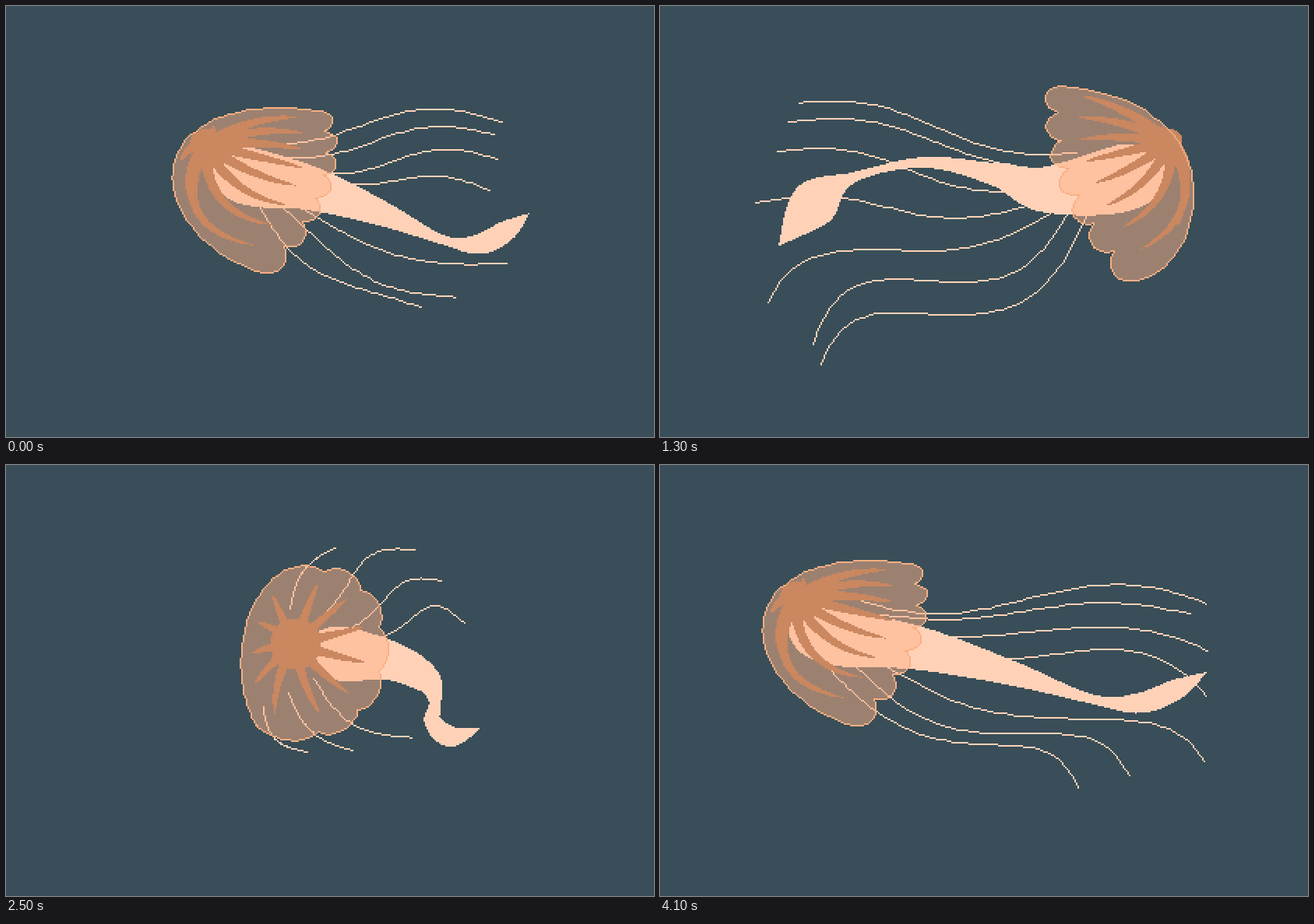
Write an HTML page with a canvas that moves like this. It is 832 px wide and 554 px high and loops after 4.2 s.

```html
<!DOCTYPE html>
<html lang="en">
<head>
<meta charset="utf-8">
<title>Jellyfish</title>
<style>
html, body { margin: 0; width: 100%; height: 100%; overflow: hidden; background: #394e58; }
canvas { display: block; width: 832px; height: 554px; image-rendering: pixelated; }
</style>
</head>
<body>
<canvas id="sea" width="416" height="277"></canvas>
<script>
const ctx = document.getElementById('sea').getContext('2d');
const WATER = '#394e58', PALE = '#ffd2b8', VEIL = 'rgba(255,180,138,.5)', RIB = '#ca8760', RIM = '#f9af82';
const { sin, cos, abs, max, min, floor, round, hypot, PI } = Math;

// Poses face left.
// dome: Bezier from the lowest lobe over the back to the upper lobe; rim: controls of the way back.
// arm: spine points with half width. upper, lower: where the first and last tentacle of a group start.
// legs: tentacle end, sag, wave.
const glide = {
  axis: 836, dx: 0, crown: [174, 170], size: 20, curl: 1, lobe: 14, hook: .4,
  dome: [[246, 335], [80, 278], [87, 95], [318, 127]],
  rim: [[346, 186], [322, 255]],
  arm: [[205, 215, 36], [330, 235, 28], [450, 267, 16], [555, 301, 6], [615, 306, 13], [664, 288, 13], [702, 266, 0]],
  upper: [[225, 163], [400, 252]], lower: [[290, 258], [210, 255]],
  legs: [[701, 178, 7, 21], [680, 191, -6, 10], [703, 238, -17, 6], [701, 297, -28, 8],
    [698, 381, 31, 8], [602, 399, 48, 8], [537, 415, 53, 2]]
};

const open = {
  axis: 832, dx: 0, crown: [177, 174], size: 16, curl: .8, lobe: 18, hook: .4,
  dome: [[219, 352], [135, 340], [78, 125], [318, 102]],
  rim: [[329, 184], [296, 267]],
  arm: [[225, 217, 42], [335, 236, 30], [400, 217, 15], [492, 201, 7], [585, 221, 7], [635, 255, 30], [680, 309, 0]],
  upper: [[297, 189], [362, 257]], lower: [[332, 267], [284, 267]],
  legs: [[653, 124, 0, 14], [668, 149, -11, 11], [682, 187, 0, 14], [709, 253, 5, 13],
    [693, 380, 14, 13], [635, 435, 42, 20], [625, 461, 80, 12]]
};

const turn = {
  axis: 832, dx: 0, crown: [372, 230], size: 33, curl: .25, lobe: 9, hook: 0,
  dome: [[322, 335], [293, 290], [293, 200], [336, 153]],
  rim: [[530, 58], [535, 410]],
  arm: [[420, 241, 34], [495, 252, 25], [540, 276, 18], [551, 304, 8], [548, 330, 11], [572, 349, 13], [611, 337, 0]],
  upper: [[365, 185], [485, 220]], lower: [[395, 275], [330, 310]],
  legs: [[423, 106, -15, 0], [525, 109, -24, 8], [559, 149, -17, 7], [589, 203, -24, 8],
    [521, 350, 24, 0], [445, 367, 17, 0], [387, 369, 18, 0]]
};

const lerp = (a, b, u) => a + (b - a) * u;

function mix(a, b, u) {
  if (typeof a === 'number') return lerp(a, b, u);
  if (Array.isArray(a)) return a.map((v, i) => mix(v, b[i], u));
  return Object.fromEntries(Object.keys(a).map(k => [k, mix(a[k], b[k], u)]));
}

const squeeze = (pts, c, k) => pts.map(([x, ...rest]) => [c + (x - c) * k, ...rest]);
const move = (pts, dx, dy) => pts.map(([x, y]) => [x + dx, y + dy]);
const droop = (p, s) => ({ ...p, legs: p.legs.map(([x, y, ...rest], i) => [x, y + s * i / 6, ...rest]) });

const brake = {
  ...glide, hook: 0,
  crown: move([glide.crown], 82, 8)[0],
  dome: move(glide.dome, 82, 8),
  rim: move(glide.rim, 82, 8),
  arm: squeeze(glide.arm, 584, .75),
  upper: [[300, 178], [400, 222]], lower: [[385, 262], [324, 255]],
  legs: [[637, 149, -14, 14], [626, 165, -7, 12], [631, 197, -3, 13], [620, 237, -7, 9],
    [643, 331, 26, 0], [577, 374, 29, -3], [533, 387, 31, 5]]
};

const front = {
  ...turn, dx: 8, crown: [390, 230], size: 35,
  arm: squeeze(turn.arm, 402, .7),
  legs: squeeze(turn.legs, 402, .7)
};

const swim = [
  open,
  { ...mix(open, glide, .5), dx: -16 },
  glide,
  droop(mix(glide, open, .35), 56),
  droop(mix(glide, open, .72), 30)
];
const turning = [brake, mix(brake, turn, .45), front, front, turn, mix(turn, swim[3], .55)];

const range = (n, f) => Array.from({ length: n + 1 }, (_, i) => f(i / n, i));

const bezier = ([a, b, c, d], t) => [0, 1].map(k => {
  const s = 1 - t;
  return s * s * s * a[k] + 3 * s * s * t * b[k] + 3 * s * t * t * c[k] + t * t * t * d[k];
});

// Catmull-Rom value in any number of dimensions.
function spline(pts, t) {
  const last = pts.length - 1, i = min(floor(t * last), last - 1), u = t * last - i;
  const [a, b, c, d] = [-1, 0, 1, 2].map(j => pts[max(0, min(last, i + j))]);
  return b.map((v, k) => v + .5 * u * (c[k] - a[k] +
    u * (2 * a[k] - 5 * v + 4 * c[k] - d[k] + u * (3 * (v - c[k]) + d[k] - a[k]))));
}

// Outline of a strip: center line with a half width at each point.
function ribbon(line) {
  const left = [], right = [];
  line.forEach(([x, y, w], i) => {
    const a = line[max(0, i - 1)], b = line[min(line.length - 1, i + 1)];
    const dx = b[0] - a[0], dy = b[1] - a[1], k = max(0, w) / (hypot(dx, dy) || 1);
    left.push([x - dy * k, y + dx * k]);
    right.unshift([x + dy * k, y - dx * k]);
  });
  return left.concat(right);
}

const rimCurve = p => [p.dome[3], ...p.rim, p.dome[0]];

function bellShape(p) {
  const lobes = 7, edge = rimCurve(p);
  const rim = range(lobes * 10, t => {
    const [x, y] = bezier(edge, t), [x2, y2] = bezier(edge, t + .01);
    const k = p.lobe * abs(sin(lobes * PI * t)) ** .7 / hypot(x2 - x, y2 - y);
    return [x + (y2 - y) * k, y - (x2 - x) * k];
  });
  return range(40, t => bezier(p.dome, t)).concat(rim);
}

// Tapered rib bending from the crown toward a point of the bell's edge.
function rib([x, y], end, reach, bend) {
  const dx = (end[0] - x) * reach, dy = (end[1] - y) * reach;
  return ribbon(range(14, u => {
    const arch = 2 * u * (1 - u) * bend;
    return [x + dx * u - dy * arch, y + dy * u + dx * arch, 7.5 * (1 - u) ** .55];
  }));
}

function ribs(p) {
  const rim = range(7, (v, i) =>
    rib(p.crown, bezier(rimCurve(p), i / 7.2), .82, (.8 * v * v - .15) * p.curl));
  const back = [.25, .5, .75].map(t => rib(p.crown, bezier(p.dome, t), .8, .3 * p.curl));
  return rim.concat(back);
}

// Sagging, waving line whose falling end may hook downward.
function tentacle(p, i) {
  const [x, y] = i < 4 ? mix(...p.upper, i / 3) : mix(...p.lower, (i - 4) / 2);
  const [ex, ey, sag, wave] = p.legs[i], dx = ex - x, dy = ey - y, len = hypot(dx, dy);
  return range(48, u => {
    const off = (sag * sin(PI * u) + wave * sin(2 * PI * u)) / len;
    const lift = p.hook * max(0, dy) * (u - u ** 14);
    return [x + dx * u - dy * off, y + dy * u + dx * off - lift];
  });
}

// Hard-edged polygon fill, row by row.
function fill(pts, color) {
  ctx.fillStyle = color;
  const ys = pts.map(p => p[1]);
  for (let y = floor(min(...ys)); y <= max(...ys); y++) {
    const hits = [], cy = y + .5;
    pts.forEach(([x1, y1], i) => {
      const [x2, y2] = pts[(i + 1) % pts.length];
      if ((y1 <= cy) !== (y2 <= cy)) hits.push([x1 + (cy - y1) / (y2 - y1) * (x2 - x1), y2 > y1 ? 1 : -1]);
    });
    hits.sort((a, b) => a[0] - b[0]);
    let wind = 0, start = 0;
    for (const [x, dir] of hits) {
      if (!wind) start = round(x);
      wind += dir;
      if (!wind) ctx.fillRect(start, y, round(x) - start, 1);
    }
  }
}

function stroke(pts, color) {
  ctx.fillStyle = color;
  const grid = pts.map(p => p.map(floor));
  for (let i = 1; i < grid.length; i++) {
    const [x, y] = grid[i - 1], dx = grid[i][0] - x, dy = grid[i][1] - y;
    const n = max(abs(dx), abs(dy), 1);
    for (let s = 0; s <= n; s++) ctx.fillRect(round(x + dx * s / n), round(y + dy * s / n), 1, 1);
  }
}

function draw(p, flip) {
  const place = pts => pts.map(([x, y]) => [(flip ? p.axis - x - p.dx : x + p.dx) / 2, y / 2]);
  ctx.fillStyle = WATER;
  ctx.fillRect(0, 0, 416, 277);
  p.legs.forEach((_, i) => stroke(place(tentacle(p, i)), PALE));
  const spine = [[...p.crown, 5], ...p.arm];
  fill(place(ribbon(range(70, t => spline(spine, t)))), PALE);
  const bell = place(bellShape(p));
  fill(bell, VEIL);
  ribs(p).forEach(shape => fill(place(shape), RIB));
  const [cx, cy] = p.crown;
  fill(place(range(32, t => [cx + p.size * cos(2 * PI * t), cy + p.size * sin(2 * PI * t)])), RIB);
  stroke(bell, RIM);
}

const begin = performance.now();
let last = -1;
function tick() {
  const step = floor((performance.now() - begin) / 100) % 42;
  if (step !== last) {
    const half = step >= 21, s = step % 21;
    draw(turning[s] || swim[(s + 2) % 5], (s >= 3) !== half);
    last = step;
  }
  requestAnimationFrame(tick);
}
tick();
</script>
</body>
</html>
```
